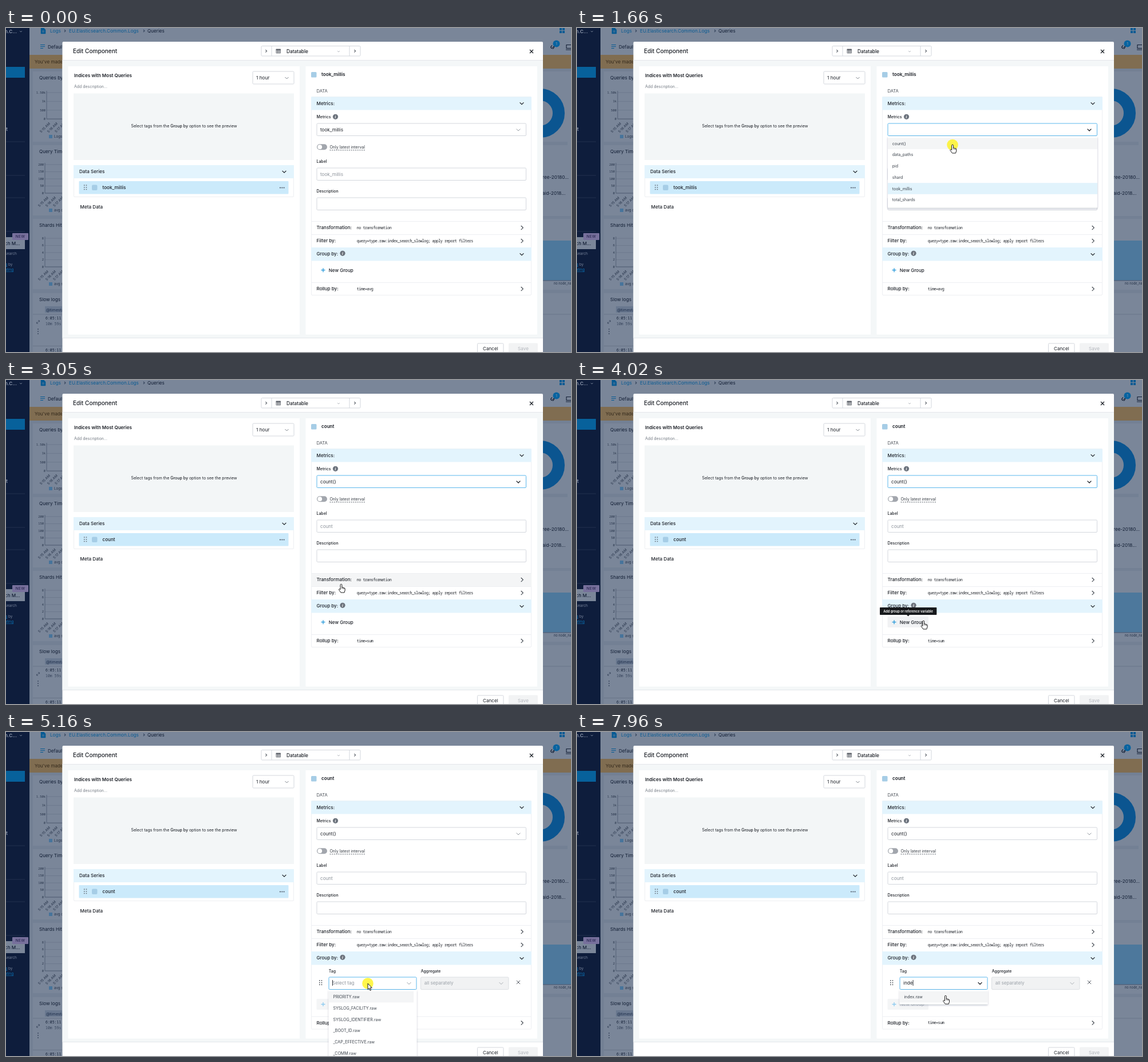
An HTML page for the animation above (8 s loop, 987 by 567 pixels).

```html
<!DOCTYPE html>
<html lang="en">
<head>
<meta charset="utf-8">
<title>Edit Component</title>
<style>
html, body { margin: 0; width: 100%; height: 100%; overflow: hidden; background: #758195; }
svg { display: block; width: 100vw; height: 100vh; }
text { font-family: Inter, Roboto, sans-serif; white-space: pre; }
.mono { font-family: "Noto Sans Mono", "DejaVu Sans Mono", monospace; }
</style>
</head>
<body>
<svg id="stage" viewBox="0 0 987 567" xmlns="http://www.w3.org/2000/svg">
  <defs>
    <filter id="shadow" x="-10%" y="-10%" width="120%" height="130%">
      <feDropShadow dx="0" dy="1.5" stdDeviation="1.6" flood-color="#091e42" flood-opacity=".28"/>
    </filter>
  </defs>
  <g id="page"></g>
  <g id="modal"></g>
  <g id="live"></g>
</svg>
<script>
const LOOP = 8000;
const INK = '#1b1f26', GREY = '#8d939b', LINE = '#e3e6ea', EDGE = '#d3d7dd';
const BLUE = '#2196d9', FOCUS = '#5bb7ec', BAND = '#e3f4fd', HOVER = '#f4f5f6', SWATCH = '#a6cde6';

const attrs = o => Object.entries(o).map(([k, v]) => ` ${k}="${v}"`).join('');
const rect = (x, y, w, h, fill, o = {}) =>
  `<rect x="${x}" y="${y}" width="${w}" height="${h}" fill="${fill}"${attrs(o)}/>`;
const box = (x, y, w, h, fill = '#fff', stroke = EDGE) =>
  rect(x + .5, y + .5, w - 1, h - 1, fill, { stroke, rx: 1.5 });
const path = (d, stroke, w = 1, o = {}) =>
  `<path d="${d}" fill="none" stroke="${stroke}" stroke-width="${w}"${attrs(o)}/>`;
const hline = (x1, x2, y, stroke = LINE) => path(`M${x1} ${y}H${x2}`, stroke);
const circle = (x, y, r, fill, o = {}) => `<circle cx="${x}" cy="${y}" r="${r}" fill="${fill}"${attrs(o)}/>`;
// y is the vertical middle of the capitals
const text = (x, y, s, size = 8.15, fill = INK, weight = 400, o = {}) =>
  `<text x="${x}" y="${y + size * .364}" font-size="${size}" fill="${fill}" font-weight="${weight}"${attrs(o)}>${s}</text>`;
const mono = (x, y, s, fill = INK) =>
  text(x, y, s, 6.7, fill, 400, { class: 'mono', 'letter-spacing': -.45 });
const down = (x, y, color = INK, w = 1.2, r = 3.4) =>
  path(`M${x - r} ${y - r / 2}l${r} ${r}l${r} ${-r}`, color, w);
const right = (x, y, color = '#3d434b', r = 3.6) =>
  path(`M${x - r / 2} ${y - r}l${r} ${r}l${-r} ${r}`, color, 1.1);
const cross = (x, y, r, color, w) =>
  path(`M${x - r} ${y - r}l${2 * r} ${2 * r}m0 ${-2 * r}l${-2 * r} ${2 * r}`, color, w);
const plus = (x, y, color) => path(`M${x - 3.5} ${y}h7m-3.5 -3.5v7`, color, 1.3);
const grip = (x, y, color = '#5a6068') =>
  [0, 1, 2, 3, 4, 5].map(i => rect(x + (i % 2) * 3.7, y + (i >> 1) * 3.6, 1.5, 1.5, color)).join('');
const info = (x, y) => circle(x, y, 4.6, '#6c737d') +
  text(x, y, 'i', 6.5, '#fff', 700, { 'text-anchor': 'middle', 'font-style': 'italic' });

function chart(top, title, axisX, labels, first, step, legend) {
  const dim = '#253248', base = first + step * (labels.length - 1);
  let s = rect(47, top, 60, 123, '#7a8699') + text(58, top + 11, title, 8.15, '#111d33');
  labels.forEach((v, i) => {
    const y = first + step * i;
    s += text(axisX - 2, y, v, 5.4, dim, 400, { class: 'mono', 'text-anchor': 'end' }) +
      hline(axisX, 99, y, '#6d798d');
  });
  s += path(`M${axisX} ${first - 3}V${base}H99`, '#4a566c', .8);
  [15, 16, 17].forEach((m, i) => {
    const x = axisX + 5 + i * 13, y = base + 7;
    s += text(x, y, `5:${m} AM`, 6, dim, 400, { 'text-anchor': 'end', transform: `rotate(-45 ${x} ${y})` });
  });
  return s + rect(75, top + 111, 6, 6, '#47749b') + text(84, top + 114, legend, 6.2, dim);
}

function drawPage() {
  const link = '#075a93', dark = '#111d33', pale = '#7a8699';
  let s = rect(0, 0, 987, 567, '#738094') + rect(41, 0, 946, 47, '#7a8699') +
    rect(41, 47, 946, 24, '#806d51') + text(50, 59, "You've made", 8.15, '#33291c');
  // header
  s += path('M61 0h5l3 3v7h-8z', link, .5, { style: `fill:${link}` }) + path('M63 5h4m-4 2h4', pale, .7) +
    text(77, 5, 'Logs', 8.15, link) + right(103, 5, '#34435c', 2) +
    text(110, 5, 'EU.Elasticsearch.Common.Logs', 8.15, link) + right(241, 5, '#34435c', 2) +
    text(247, 5, 'Queries', 8.15, dark) +
    path('M60 29.5h8m-8 3h8m-8 3h5', link, 1.2) + text(73, 33, 'Default', 8.15, dark);
  for (const [x, y] of [[967, 0], [972, 0], [967, 5], [972, 5]]) s += rect(x, y, 4, 4, link);
  s += path('M954 36l-2 -1.500a2.400 2.400 0 0 1 0 -2l2 -2m1 6l2 -2a2.400 2.400 0 0 0 0 -3', dark, 1.2) +
    path('M953 36l4.500 -4.500', dark, 1) + circle(961.5, 27.5, 6, '#0763a0') +
    text(961.5, 27.5, '1', 6.5, '#8d98a9', 400, { 'text-anchor': 'middle' }) +
    path('M979 29.500h9v6h-9zm-1 8.500h10', dark, 1.1);
  // left charts
  s += chart(76, 'Queries by', 71, ['1.50k', '1k', '500', '0'], 113, 15.4, 'Logs') +
    chart(205, 'Query Time', 68, ['200', '150', '100', '50', '0'], 239, 12.5, 'avg d') +
    chart(334, 'Shards Hit', 68, ['8', '6', '4', '2', '0'], 368, 12.5, 'avg s');
  s += rect(47, 464, 60, 110, pale) + text(58, 475, 'Slow logs', 8.15, dark) +
    rect(68, 487, 40, 11, '#69788f') + text(70, 493, '@timestamp', 7, '#1c2c49') +
    hline(47, 99, 501, '#687489') + hline(47, 99, 556.5, '#687489');
  for (const y of [508, 564]) s += text(69, y, '6:05:11', 6.5, dark, 500, { class: 'mono' });
  s += text(69, 518, '10m 59s', 6.5, '#36445b', 400, { class: 'mono' }) +
    path('M53.500 517l5 -5m-2.500 0h2.500v2.500m-5 0v2.500h2.500', '#36445b', .8);
  for (const y of [527, 531, 535]) s += circle(56, y, .9, '#36445b');
  // right cards
  s += rect(930, 76, 51, 123, pale) + rect(930, 205, 51, 124, pale) + rect(930, 334, 57, 124, pale) +
    rect(930, 464, 57, 103, pale) + rect(981, 76, 6, 253, pale) +
    circle(933, 149, 32.5, 'none', { stroke: '#0b5590', 'stroke-width': 21 }) +
    text(937, 261, 'ree-20180...', 8.15, dark) + text(937, 289, 'aid-2018...', 8.15, dark) +
    rect(930, 372, 57, 70, '#4d789c') + hline(930, 987, 442, '#4a566c') +
    text(957, 447, 'no node_name', 5.6, '#253248') + hline(930, 987, 501, '#687489');
  // sidebar
  s += rect(0, 0, 41, 567, '#0e1d3c') + text(-2, 6, 'h.C...', 8.15, '#929db0', 600) +
    down(26, 6, '#7a8699', .9, 2) + rect(0, 68, 33, 19, '#07619b') + text(0, 177, 't', 8.15, '#929db0', 600);
  for (const y of [199, 258, 297, 356]) s += hline(0, 33, y, '#22314f');
  s += rect(-2, 366, 35, 21, '#7a8699') + text(-2, 377, 'ch M...', 8.15, dark, 500) +
    rect(11, 359, 28, 12, '#77709c', { rx: 1 }) + text(25, 365, 'NEW', 6.5, '#1c1b45', 400, { 'text-anchor': 'middle', 'letter-spacing': .5 }) +
    text(-2, 395, 'search', 6.5, '#77839a') +
    text(-2, 414, 'g', 6.5, '#0a72b5', 400, { 'text-decoration': 'underline' }) + text(4, 414, 'by', 6.5, '#77839a') +
    text(-2, 423, 'ating', 6.5, '#0a72b5', 400, { 'text-decoration': 'underline' });
  return s;
}

function drawModal() {
  let s = rect(98.5, 24, 839.5, 550, '#fff', { rx: 2 }) + rect(98.5, 56, 839.5, 486, '#f4f7f8') +
    hline(98.5, 938, 56.5) + hline(98.5, 938, 542.5) +
    rect(108.5, 67, 404.5, 469.5, '#fff') + rect(523.5, 67, 404.5, 469.5, '#fff');
  // title bar
  s += text(117, 40, 'Edit Component', 10.1, INK, 500) + cross(918, 41, 3, INK, 1.3) +
    box(445.5, 31, 174, 18.5) + path('M464 31.500V49M600 31.500V49', EDGE) +
    right(454.5, 40.3, '#555b63', 2.2) + right(609.5, 40.3, '#555b63', 2.2) +
    path('M472 37.500h7.500v6.500h-7.500zm0 2.200h7.500m-7.500 2.200h7.500m-5 -4.400v6.500m2.500 -6.500v6.500', '#454b54', .7) +
    rect(471.7, 36.7, 8, 1.8, '#454b54') + text(490, 41, 'Datatable', 8.3, INK, 500) + down(581, 41, '#a4a9b0', .8, 2);
  // left column
  s += text(119, 83, 'Indices with Most Queries', 8.05, INK, 600) + text(119, 102, 'Add description...', 6.95, '#737a83') +
    box(430.5, 75.5, 73, 23) + text(437, 87, '1 hour', 8.2) + down(490.5, 87.5, '#6f757d', .9, 3) +
    rect(118, 114.5, 385, 116.5, '#f3f6f7') +
    text(311, 171.5, 'Select tags from the <tspan font-weight="500">Group by</tspan> option to see the preview', 7, INK, 400, { 'text-anchor': 'middle' }) +
    box(118, 240, 385, 56, '#fff', '#edeff2') + rect(118, 240, 385, 23, BAND) +
    text(128, 251.5, 'Data Series', 8.1, INK, 500) + down(486, 251.5) +
    rect(127.5, 268, 366, 22.5, '#cbeafb', { rx: 1 }) + grip(136, 274.5) +
    rect(150, 274.5, 9.5, 9.5, SWATCH, { rx: 2 }) + text(129.5, 313, 'Meta Data', 8.15, INK, 500);
  for (const x of [479, 482.3, 485.6]) s += circle(x, 279.5, 1.1, '#4b5563');
  // right column heading
  s += rect(533, 77, 9.5, 9.5, SWATCH, { rx: 1.5 }) + text(542.5, 110.5, 'DATA', 7.6, '#4a5058');
  // footer
  return s + box(823, 551.5, 46.5, 22) + text(846.3, 561.5, 'Cancel', 8.15, INK, 400, { 'text-anchor': 'middle' }) +
    rect(878, 551.5, 51, 22, '#f2f3f4', { rx: 1.5 }) + text(903.5, 561, 'Save', 8.15, '#b3b7bd', 400, { 'text-anchor': 'middle' });
}

const METRICS = ['count()', 'data_paths', 'pid', 'shard', 'took_millis', 'total_shards'];
const TAGS = ['PRIORITY', 'SYSLOG_FACILITY', 'SYSLOG_IDENTIFIER', '_BOOT_ID', '_CAP_EFFECTIVE',
  '_COMM', '_GID', '_MACHINE_ID', 'index'].map(s => s + '.raw');
const MOVES = [
  [20, 962, 582], [720, 660, 174.5], [1110, 660, 174.5], [1250, 660, 199], [1380, 660, 199], [1450, 656, 204.5],
  [2200, 656, 204.5], [3050, 585.5, 357.5], [3780, 605.3, 421.5], [4440, 605.3, 421.5],
  [4890, 632, 440], [7580, 632, 440], [7960, 643.8, 461.5]
];
const KEYS = [[6280, 'i'], [6420, 'in'], [6480, 'ind'], [6630, 'inde']];
const CLICKS = [[910, 1050], [1660, 1860], [4090, 4230], [5160, 5300]];
const CARETS = [[980, 1450], [5160, 5680], [6210, 7160], [7690, 8000]];
const within = (list, t) => list.some(([a, b]) => t >= a && t < b);

function pointer(t) {
  const i = MOVES.findIndex(m => m[0] > t);
  if (i < 1) return MOVES[i < 0 ? MOVES.length - 1 : 0].slice(1);
  const [t0, x0, y0] = MOVES[i - 1], [t1, x1, y1] = MOVES[i];
  const k = (t - t0) / (t1 - t0), e = (1 - Math.cos(Math.PI * k)) / 2;
  return [x0 + (x1 - x0) * e, y0 + (y1 - y0) * e];
}

const HAND = 'M-1.4 8.500V1Q-1.400 -.2 0 -.2T1.400 1V5.500Q2.700 4.600 3.500 6Q4.700 5.200 5.300 6.600Q6.700 6.200 6.700 8V10.500L5.500 14.500H-.5L-3.900 9.800Q-4.500 8.600 -3.500 8.200T-1.400 9.200Z';
const ARROW = 'M0 0V10.500L2.400 8.400L4 12.400L5.700 11.700L4.100 7.800H7.300Z';

function menu(x, y, w, h, rows, activeFill, rowWidth) {
  let s = rect(x, y, w, h, '#fff', { filter: 'url(#shadow)', rx: 1 });
  rows.forEach((label, i) => {
    const cy = y + 12.2 + i * 19.7, fill = activeFill(label, i);
    if (fill) s += rect(x, cy - 9.9, rowWidth, 19.7, fill);
    s += text(x + 7.7, cy, label, 7.05, '#3c434c');
  });
  return s;
}

function drawLive(t) {
  const [mx, my] = pointer(t);
  const over = (x, y, w, h) => mx >= x && mx < x + w && my >= y && my < y + h;
  const caret = within(CARETS, t);
  const picking = t >= 980 && t < 1780, picked = t >= 1780;
  const focus = t >= 980 && t < 4090, grouped = t >= 4230, tagging = t >= 5160;
  const name = picked ? 'count' : 'took_millis';
  const typed = KEYS.reduce((s, [at, v]) => t >= at ? v : s, '');
  const rollY = grouped ? 497.5 : 445;
  let hand = false;
  const hot = (x, y, w, h) => {
    const on = !picking && over(x, y, w, h);
    if (on) hand = true;
    return on;
  };

  let s = text(551, 81.5, name, 8.1, INK, 600) + text(168.5, 279, name, 8.15, INK, 500);
  s += box(533, 120, 385, rollY - 97, '#fff', '#edeff2');

  // metrics section
  s += rect(533, 120.5, 385, 23, BAND) + text(542.5, 132, 'Metrics:', 8.1, INK, 500) + down(901, 132) +
    text(542.5, 155, 'Metrics', 6.95, INK, 500) + info(575.5, 155.3) +
    box(542.5, 166.5, 366.5, 22.5, '#fff', focus ? FOCUS : EDGE) +
    (picking ? '' : text(549, 178, picked ? 'count()' : 'took_millis', 8.15)) +
    down(895, 178.3, focus ? INK : '#8a9098', focus ? 1.3 : .9) +
    rect(543, 203.2, 18, 10, '#a2a6ad', { rx: 5 }) + circle(548.2, 208.2, 3.9, '#fff') +
    text(565.5, 208.2, 'Only latest interval', 7, '#333941') +
    path('M565.500 213.700H627', '#4f565f', .9, { 'stroke-dasharray': '2.2 1.5' }) +
    text(542.5, 233.3, 'Label', 6.95, INK, 500) + box(542.5, 244.5, 366.5, 22.5) + text(549, 255.7, name, 8.15, GREY) +
    text(542.5, 285.5, 'Description', 6.95, INK, 500) + box(542.5, 296.5, 366.5, 22.5);

  // collapsible rows
  const row = (y, label, value) =>
    (hot(533, y, 385, 23) ? rect(533.5, y, 384, 23, HOVER) : '') + hline(533, 918, y + .5, '#edeff2') +
    text(542.5, y + 11.3, label, 8.1, INK, 500) + mono(612.8, y + 11.3, value) + right(901.5, y + 11.6);
  s += row(338, 'Transformation:', 'no transformation') +
    row(361, 'Filter by:', 'query=type.raw:index_search_slowlog; apply report filters') +
    row(rollY, 'Rollup by:', picked ? 'time=sum' : 'time=avg');
  hot(533, 384, 385, 23.5);
  s += rect(533, 384, 385, 23.5, BAND) + text(542.5, 394.7, 'Group by:', 8.05, INK, 500) +
    info(588, 394.3) + down(901, 396);

  // group section
  if (!grouped) {
    if (hot(542.5, 414, 71.5, 19)) s += rect(542.5, 414, 71.5, 19, '#f1f2f4', { rx: 1.5 });
    s += plus(554, 423.7, BLUE) + text(563.8, 423.7, 'New Group', 8, INK, 500);
  } else {
    s += rect(542.5, 467, 71.5, 19, HOVER, { rx: 1.5 }) + plus(554, 476.5, '#8ccaf0') +
      text(563.8, 476.3, 'New Group', 8, '#b3b8be', 500) +
      text(563.8, 418, 'Tag', 6.95, INK, 500) + text(724.7, 418, 'Aggregate', 6.95, INK, 500) +
      grip(547, 434.3, '#343a42') + cross(895, 438, 3.1, '#555b63', 1) +
      box(563.5, 428.5, 154, 22.5, '#fff', tagging ? FOCUS : EDGE) +
      box(724, 428.5, 154.5, 22.5, '#f1f2f3', '#dcdfe3') + text(730.7, 439.5, 'all separately', 8.1, '#9ba1a8') +
      down(865, 439.8, '#a0a5ac', .9) +
      text(570, 439.5, typed || 'Select tag', 8.15, typed ? INK : GREY) +
      down(704, 439.8, t >= 5230 ? INK : '#8a9098', t >= 5230 ? 1.3 : .9);
  }

  // menus
  if (picking) {
    if (over(543, 191, 366, 123)) hand = true;
    s += menu(543, 190, 366, 124.5, METRICS, (label, i) =>
      hand && Math.floor((my - 192.3) / 19.7) === i ? HOVER : label === 'took_millis' ? '#e1f3fc' : '', 366);
    if (caret) s += rect(549, 173, .9, 10, INK);
  }
  if (tagging) {
    const rows = TAGS.filter(v => v.toLowerCase().includes(typed));
    if (over(564, 452, 154, 115)) hand = true;
    s += menu(563.7, 451.4, 153.8, Math.min(rows.length * 19.7 + 5.3, 160), rows,
      (label, i) => i ? '' : HOVER, rows.length > 5 ? 148.5 : 153.8);
    if (caret) s += rect([570, 572.3, 577, 581.9, 586.6][typed.length], 434, .9, 10, INK);
  }
  if (t >= 3830 && t < 4160) {
    s += rect(529, 398, 99.3, 13, '#17191c', { rx: .8 }) + '<path d="M576 411h5l-2.500 2.500z" fill="#17191c"/>' +
      text(578.6, 404.6, 'Add group or reference variable', 5.65, '#fff', 600, { 'text-anchor': 'middle' });
  }

  // pointer
  if (t >= 20) {
    if (within(CLICKS, t)) s += circle(mx, my, 9.8, '#fff200', { 'fill-opacity': .7 });
    s += `<path d="${hand ? HAND : ARROW}" transform="translate(${mx.toFixed(2)} ${my.toFixed(2)})" fill="#fff" stroke="#111" stroke-width=".95" stroke-linejoin="round"/>`;
    if (hand) s += path('M1.400 5.500V8M3.500 6V8.300M5.300 6.600V8.500', '#111', .7, { transform: `translate(${mx.toFixed(2)} ${my.toFixed(2)})` });
  }
  return s;
}

const $ = id => document.getElementById(id);
$('page').innerHTML = drawPage();
$('modal').innerHTML = drawModal();
const start = performance.now();
let shown = '';
function render() {
  const next = drawLive(Math.max(0, performance.now() - start) % LOOP);
  if (next !== shown) $('live').innerHTML = shown = next;
  requestAnimationFrame(render);
}
render();
</script>
</body>
</html>
```
